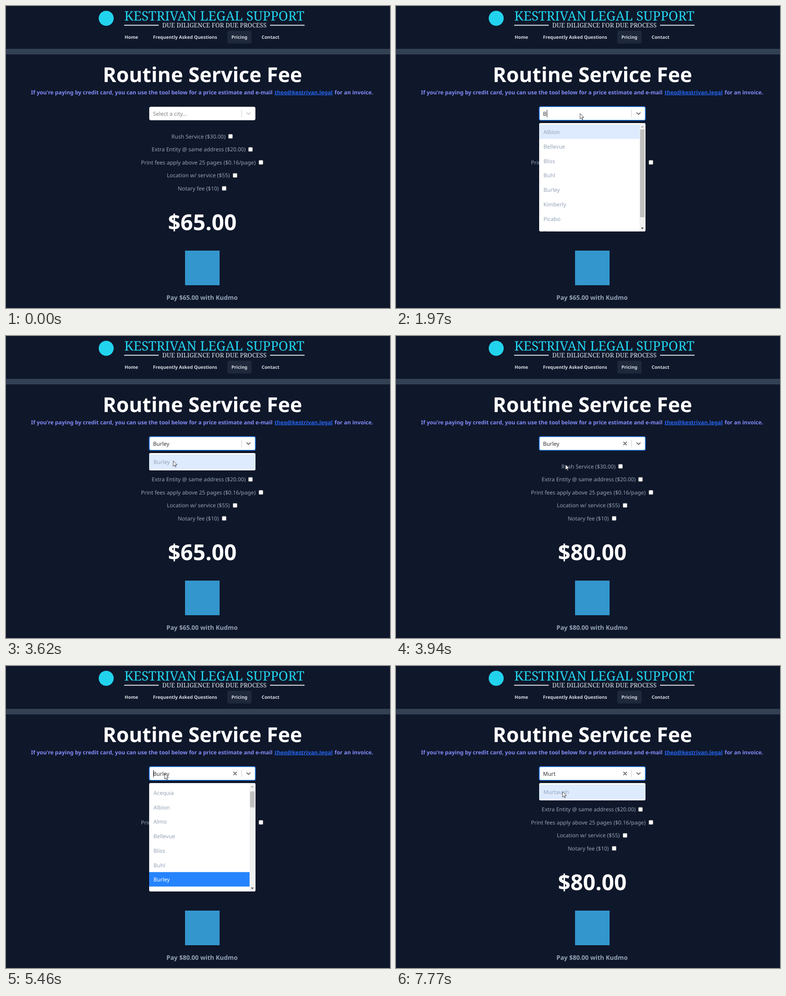
Animation, 845 px wide and 663 px high, one loop 8000 ms. Source, as an HTML page:

```html
<!DOCTYPE html>
<html lang="en">
<head>
<meta charset="utf-8">
<title>Routine Service Fee</title>
<style>
  html, body { margin: 0; width: 100%; height: 100%; overflow: hidden; background: #0f172a; }
  svg { display: block; width: 100%; height: 100%; }
  text { font: 12px "Noto Sans", "Open Sans", sans-serif; text-rendering: geometricPrecision; white-space: pre; }
  .serif { font-family: "Noto Serif", "Liberation Serif", serif; }
  .bold { font-weight: 700; }
  .mid { text-anchor: middle; }
  .slate { fill: #94a3b8; }
  #beam { mix-blend-mode: difference; }
</style>
</head>
<body>
<svg id="stage" viewBox="0 0 845 663">
  <defs><clipPath id="clip"><rect id="clipBox" x="315" y="257" width="234" rx="3"/></clipPath></defs>
  <rect width="845" height="663" fill="#0f172a"/>

  <circle cx="220.500" cy="27" r="16.500" fill="#22d3ee"/>
  <text class="serif mid" x="458.500" y="32.200" style="font-size:28.7px" fill="#22d3ee">KESTRIVAN LEGAL SUPPORT</text>
  <text class="serif mid" x="458.500" y="47" style="font-size:13.6px" fill="#e2e8f0">DUE DILIGENCE FOR DUE PROCESS</text>
  <path d="M260 42.300H336M581 42.300H657" stroke="#e2e8f0" stroke-width="2"/>

  <rect x="487" y="54" width="53.500" height="28.500" rx="4" fill="#1e293b"/>
  <g id="nav" fill="#d7dbe2"></g>
  <rect y="94" width="845" height="12.300" fill="#334155"/>

  <text class="bold mid" x="432.300" y="166.500" style="font-size:45px" fill="#fff">Routine Service Fee</text>
  <g fill="#818cf8">
    <text class="bold" x="55" y="193.500">If you're paying by credit card, you can use the tool below for a price estimate and e-mail</text>
    <text class="bold" x="591" y="193.500" fill="#2563eb" text-decoration="underline">theo@kestrivan.legal</text>
    <text class="bold" x="723" y="193.500">for an invoice.</text>
  </g>

  <g id="extras"></g>
  <text id="price" class="bold mid" x="432" y="492" style="font-size:48px" fill="#fff"></text>
  <rect x="394" y="537" width="76" height="76" fill="#3396cd"/>
  <text id="pay" class="bold mid slate" x="431.500" y="645" style="font-size:13.600px"></text>

  <rect id="field" rx="3" fill="#fff"/>
  <text id="value" x="323.500" y="241"></text>
  <rect id="caret" y="228" width="1" height="16.500" fill="#222"/>
  <path d="M518.500 228V244" stroke="#ccc"/>
  <path id="chevron" d="M529.700 234.300L533.600 238L537.500 234.300" fill="none" stroke-width="1.800" stroke-linecap="round" stroke-linejoin="round"/>
  <path id="clear" d="M501 233L507.200 239.200M507.200 233L501 239.200" stroke="#666" stroke-width="1.800" stroke-linecap="round"/>

  <g id="menu">
    <rect id="panel" x="315" y="257" width="234" rx="3" fill="#fff"/>
    <g clip-path="url(#clip)">
      <rect id="active" x="315" height="31.750"/>
      <g id="rows"></g>
      <g id="bar">
        <rect x="536" y="257" width="12" height="238" fill="#f1f1f1"/>
        <rect id="thumb" x="537" width="10" fill="#c1c1c1"/>
        <path d="M539 266.500L542 263L545 266.500Z" fill="#a3a3a3"/>
        <path d="M539 486.500L542 490L545 486.500Z" fill="#404040"/>
      </g>
    </g>
  </g>

  <circle id="halo" r="9.500" fill="#ffee00" fill-opacity=".78"/>
  <path id="arrow" d="M0 0V11.800L2.800 9.300L4.700 13.500L6.400 12.800L4.600 8.700H8.500Z" fill="#fff" stroke="#111" stroke-width=".8"/>
  <path id="beam" d="M-2.500 -6.500H2.500M-2.500 6.500H2.500M0 -6.500V6.500" stroke="#fff" stroke-width="1.100" fill="none"/>
</svg>
<script>
const LOOP = 8000, STEP = 65.8, ROW = 31.75, PAD = 3.2, TOP = 257, MAX_H = 238;
const $ = id => document.getElementById(id);
const set = (el, attrs) => { for (const k in attrs) el.setAttribute(k, attrs[k]); };
const show = (el, on) => el.setAttribute('visibility', on ? 'visible' : 'hidden');
function add(parent, tag, attrs, text = '') {
  const el = document.createElementNS('http://www.w3.org/2000/svg', tag);
  set(el, attrs);
  el.textContent = text;
  parent.appendChild(el);
  return el;
}

for (const [x, label] of [[261, 'Home'], [323.5, 'Frequently Asked Questions'], [496, 'Pricing'], [562.5, 'Contact']])
  add($('nav'), 'text', { x, y: 72.2, class: 'bold', style: 'font-size:10.05px' }, label);

[
  [364, 494, 'Rush Service ($30.00)'],
  [320.5, 538, 'Extra Entity @ same address ($20.00)'],
  [297, 561, 'Print fees apply above 25 pages ($0.16/page)'],
  [354, 504, 'Location w/ service ($55)'],
  [378, 480, 'Notary fee ($10)']
].forEach(([x, box, label], i) => {
  const y = 286.2 + i * 28.55;
  add($('extras'), 'text', { x, y: y + 4.4, class: 'slate' }, label);
  add($('extras'), 'rect', { x: box - 4.6, y: y - 4.6, width: 9.2, height: 9.2, rx: 1.5, fill: '#fff', stroke: '#767676', 'stroke-width': .8 });
});

const rows = Array.from({ length: 9 }, () => add($('rows'), 'text', { x: 324.5 }));

const ALL = ['Twin Falls', 'Acequia', 'Albion', 'Almo', 'Bellevue', 'Bliss', 'Buhl', 'Burley', 'Carey'];
const list = (items, total = items.length, scroll = 0, chosen = -1) => ({ items, total, scroll, chosen });
const full = list(ALL, 45);
const reopened = list(ALL, 45, 30, 7);
const withB = list(['Albion', 'Bellevue', 'Bliss', 'Buhl', 'Burley', 'Kimberly', 'Picabo', 'Sublett']);
const withBu = list(['Buhl', 'Burley']);
const burley = list(['Burley']);
const withM = list(['Almo', 'Hagerman', 'Idahome', 'Jerome', 'Ketchum', 'Kimberly', 'Malta', 'Murtaugh']);
const murtaugh = list(['Murtaugh']);

// time, field text, menu
const STATES = [
  [0, '', null], [860, '', full], [1840, 'B', withB], [2110, 'Bu', withBu],
  [2370, 'Burl', burley], [2500, 'Burle', burley], [2640, 'Burley', burley],
  [3750, 'Burley', null], [5270, 'Burley', reopened],
  [6580, 'M', withM], [6840, 'Mu', murtaugh], [6910, 'Mur', murtaugh], [7100, 'Murt', murtaugh]
];
// intervals when the caret is lit
const CARET = [[860, 1450], [1840, 3160], [3690, 3750], [5270, 5790], [6310, 7630]];
const CLICKS = [[860, 1060], [3690, 3880], [5200, 5400]];
// time, x, y of the pointer
const PATH = [
  [130, 700, 566], [590, 405, 236], [3290, 405, 236], [3620, 368, 274], [3750, 368, 275], [3940, 373, 282],
  [4010, 373, 282], [4340, 400, 470], [4600, 500, 476], [4800, 500, 476], [4870, 376, 470],
  [5200, 381, 238], [5330, 381, 238], [5660, 299, 234], [7430, 299, 234], [7770, 366.5, 276]
];

const within = (spans, t) => spans.some(([a, b]) => t >= a && t < b);
const last = (table, t) => table.filter(s => s[0] <= t).pop();

function pointer(t) {
  const i = PATH.findIndex(p => p[0] > t);
  if (i < 0) return PATH[PATH.length - 1].slice(1);
  if (i === 0) return null;
  const [t0, x0, y0] = PATH[i - 1], [t1, x1, y1] = PATH[i];
  const u = (t - t0) / (t1 - t0), k = u * u * (3 - 2 * u);
  return [x0 + (x1 - x0) * k, y0 + (y1 - y0) * k];
}

function drawMenu(menu) {
  show($('menu'), menu);
  show($('bar'), false);
  if (!menu) return;
  const { items, total, scroll, chosen } = menu;
  const content = total * ROW + 2 * PAD, h = Math.min(Math.round(content), MAX_H), long = content > MAX_H;
  set($('panel'), { height: h });
  set($('clipBox'), { height: h });
  const y0 = TOP + PAD - scroll;
  set($('active'), {
    y: y0 + Math.max(chosen, 0) * ROW, width: long ? 221 : 234,
    fill: chosen < 0 ? '#deebff' : '#2684ff'
  });
  rows.forEach((row, i) => {
    row.textContent = items[i] || '';
    set(row, { y: y0 + i * ROW + 20.8, fill: i === chosen ? '#fff' : '#94a3b8' });
  });
  if (long) {
    $('bar').setAttribute('visibility', 'inherit');
    set($('thumb'), { y: 271 + 211 * scroll / content, height: 211 * MAX_H / content });
  }
}

let shown;
function render(now) {
  const t = Math.floor((now + 9) / STEP) * STEP + 9;
  const [, typed, menu] = last(STATES, t);
  const focus = t >= 860, picked = t >= 3750;

  if (menu !== shown) drawMenu(shown = menu);

  set($('field'), focus
    ? { x: 315.4, y: 221, width: 233.2, height: 29.8, stroke: '#2684ff', 'stroke-width': 1.6 }
    : { x: 315.5, y: 221.5, width: 233, height: 29, stroke: t >= 520 ? '#b3b3b3' : '#ccc', 'stroke-width': 1 });
  $('value').textContent = typed || 'Select a city...';
  set($('value'), { fill: typed ? '#333' : '#808080' });

  const entering = typed && !(t >= 3750 && t < 6580);
  set($('caret'), { x: entering ? 324 + $('value').getComputedTextLength() : 324 });
  show($('caret'), within(CARET, t));

  const grey = Math.round(204 - 102 * Math.min(1, Math.max(0, (t - 790) / 270)));
  set($('chevron'), { stroke: `rgb(${grey},${grey},${grey})` });
  show($('clear'), picked);

  const sum = picked ? '$80.00' : '$65.00';
  $('price').textContent = sum;
  $('pay').textContent = `Pay ${sum} with Kudmo`;

  const p = pointer(t);
  const overPrice = p && !menu && p[0] > 358 && p[0] < 507 && p[1] > 445 && p[1] < 505;
  show($('arrow'), p && !overPrice);
  show($('beam'), overPrice);
  show($('halo'), p && within(CLICKS, t));
  if (p) for (const id of ['arrow', 'beam', 'halo']) set($(id), { transform: `translate(${p})` });
}

function tick() {
  render(performance.now() % LOOP);
  requestAnimationFrame(tick);
}
drawMenu(null);
tick();
</script>
</body>
</html>
```
